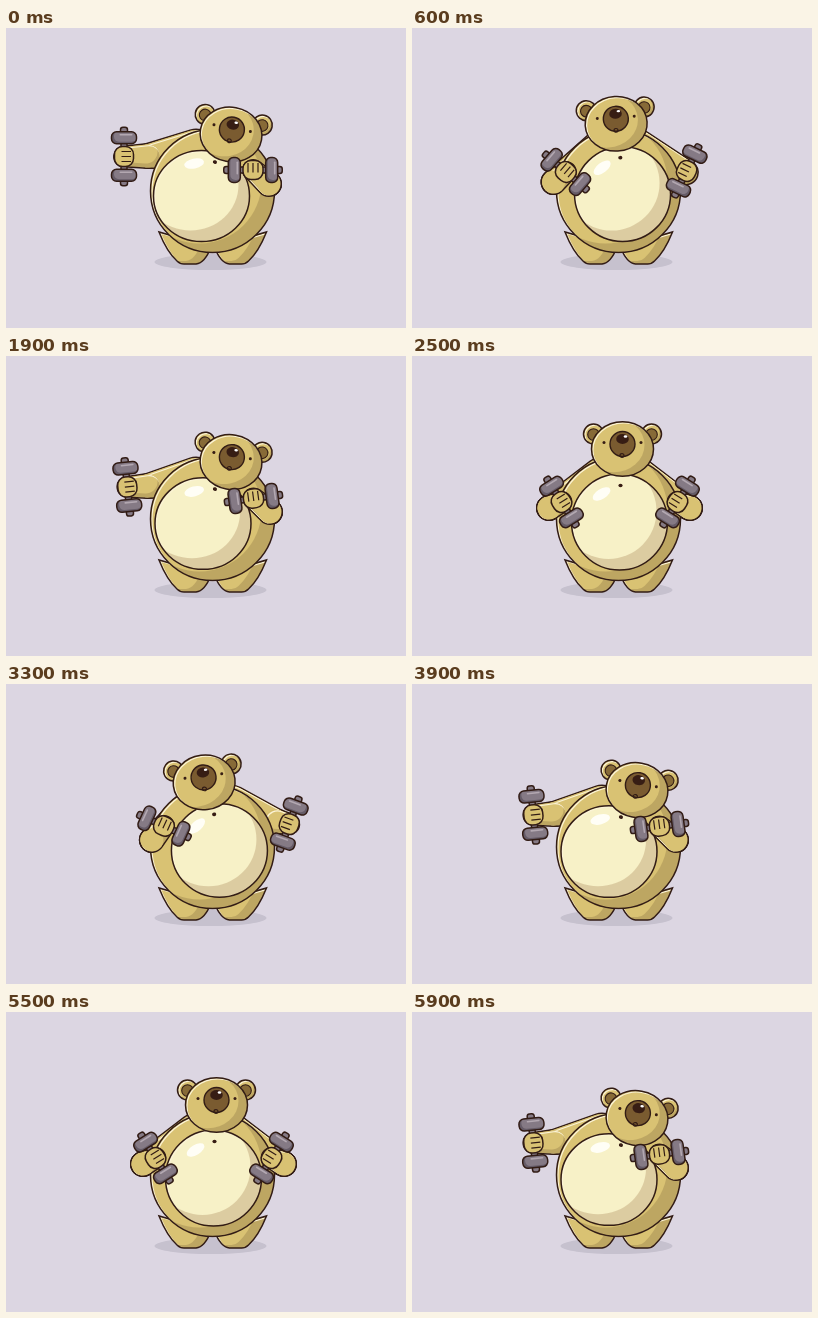
These frames come from a looping animation (400 by 300 pixels, 6000 ms). An HTML page with a canvas:

```html
<!DOCTYPE html>
<html lang="en">
<head>
<meta charset="utf-8">
<title>Bear with dumbbells</title>
<style>
html, body { margin: 0; width: 100%; height: 100%; overflow: hidden; background: #dcd6e2; }
canvas { display: block; width: 400px; height: 300px; }
</style>
</head>
<body>
<canvas id="stage" width="400" height="300"></canvas>
<script>
const ctx = document.getElementById('stage').getContext('2d');
const TAU = Math.PI * 2;
const RAD = Math.PI / 180;
const MIRROR = 415;
const LINE = 1.5;
const C = {
  bg: '#dcd6e2', floor: '#c6c1ce', line: '#321c15',
  fur: '#d9c273', furShade: '#bda662', rim: '#fbf3d6',
  belly: '#f7f1c7', bellyShade: '#dccca1', ear: '#876a37',
  muzzle: '#7a5b30', nose: '#371d14',
  iron: '#857a85', ironShade: '#655b67', ironLight: '#b3a8b1'
};

// Pose of one arm, from folded (-1) to stretched out (1).
const STRETCH = [-1, -.87, -.5, 0, .5, .87, 1];
const ARM = {
  handX: [168, 167.5, 158, 149.5, 131.5, 121.5, 118],
  handY: [142, 142.5, 142, 146, 140, 131, 128.5],
  elbowX: [152, 151, 146, 137, 145, 142, 142],
  elbowY: [156, 156, 156, 152, 137, 130, 128],
  angle: [0, 8, 24, 58, 70, 84, 90]
};
const LEAN = [0, .5, .87, 1];
const HEAD = { x: [0, 12.5, 14.5, 14.5], y: [0, 5.5, 13, 13.5], tilt: [0, 7, 10, 10.5] };

let lightSide = 1;

function lerpKeys(keys, values, k) {
  let i = 1;
  while (i < keys.length - 1 && k > keys[i]) i++;
  const f = (k - keys[i - 1]) / (keys[i] - keys[i - 1]);
  return values[i - 1] + (values[i] - values[i - 1]) * f;
}

function oval(x, y, rx, ry = rx, turn = 0) {
  const p = new Path2D();
  p.ellipse(x, y, rx, ry, turn, 0, TAU);
  return p;
}

function box(x, y, w, h, r) {
  const p = new Path2D();
  p.roundRect(x - w / 2, y - h / 2, w, h, r);
  return p;
}

function limb(x1, y1, r1, x2, y2, r2) {
  const dir = Math.atan2(y2 - y1, x2 - x1);
  const spread = Math.acos((r1 - r2) / Math.hypot(x2 - x1, y2 - y1));
  const p = new Path2D();
  p.arc(x1, y1, r1, dir + spread, dir - spread + TAU);
  p.arc(x2, y2, r2, dir - spread, dir + spread);
  p.closePath();
  return p;
}

function fill(path, color) {
  ctx.fillStyle = color;
  ctx.fill(path);
}

function stroke(path, width = LINE, color = C.line) {
  ctx.strokeStyle = color;
  ctx.lineWidth = width;
  ctx.stroke(path);
}

function within(path, draw) {
  ctx.save();
  ctx.clip(path);
  draw();
  ctx.restore();
}

// Thin light line inside the edge that faces the upper left.
function rim(path) {
  within(path, () => {
    ctx.translate(1.4 * lightSide, 1.2);
    stroke(path, 1.2, C.rim);
  });
}

// Lit solid: the shade shows where the shifted light copy does not reach.
function solid(path, light, shade, dx, dy) {
  fill(path, shade);
  within(path, () => {
    ctx.translate(dx * lightSide, dy);
    fill(path, light);
  });
  rim(path);
}

function mirrored(draw) {
  ctx.save();
  ctx.translate(MIRROR, 0);
  ctx.scale(-1, 1);
  lightSide = -1;
  draw();
  lightSide = 1;
  ctx.restore();
}

function armPose(stretch) {
  const pose = {};
  for (const key in ARM) pose[key] = lerpKeys(STRETCH, ARM[key], stretch);
  pose.upper = limb(190, 121, 19, pose.elbowX, pose.elbowY, 11.5);
  pose.fore = limb(pose.elbowX, pose.elbowY, 11.5, pose.handX, pose.handY, 9.5);
  return pose;
}

function foot() {
  const p = new Path2D('M153 204 Q161 224 171 233 Q174 236 178 236 L190 236 Q199 235 205 219 Z');
  solid(p, C.fur, C.furShade, -10, -3);
  stroke(p);
}

function plate(offset) {
  const p = box(offset, 0, 12, 25, 5);
  fill(p, C.ironShade);
  within(p, () => {
    fill(box(offset - 1.5, -1.5, 11, 23, 5), C.iron);
    fill(box(offset - 3, -2, 1.6, 13, .8), C.ironLight);
  });
  stroke(p);
}

function handWithWeight(pose) {
  ctx.save();
  ctx.translate(pose.handX, pose.handY);
  ctx.rotate(pose.angle * RAD);
  for (const side of [-1, 1]) {
    const cap = box(side * 26, 0, 6.5, 7, 2.5);
    fill(cap, C.iron);
    stroke(cap);
  }
  const bar = box(0, 0, 34, 6, 1);
  fill(bar, C.iron);
  stroke(bar);
  plate(-18.7);
  plate(18.7);
  const fist = box(0, 0, 20, 19, 8);
  fill(fist, C.fur);
  stroke(fist);
  const fingers = new Path2D();
  for (const x of [-5, 0, 5]) {
    fingers.moveTo(x, -7);
    fingers.lineTo(x, 2.5);
  }
  stroke(fingers, 1.2);
  ctx.restore();
}

function armFill(pose) {
  for (const part of [pose.upper, pose.fore]) stroke(part, LINE * 2);
  solid(pose.upper, C.fur, C.furShade, -3, -5);
  solid(pose.fore, C.fur, C.furShade, -2, -4);
}

function torso() {
  const p = oval(206.5, 163, 62, 61.5);
  solid(p, C.fur, C.furShade, -13, -9);
  stroke(p);
}

function belly(u) {
  const p = oval(207.5 - 12 * u, 166 + 2 * u * u, 48, 48 - 2.5 * Math.abs(u));
  solid(p, C.belly, C.bellyShade, -11, -11);
  stroke(p);
  ctx.save();
  ctx.translate(207.5 - 12 * u, 166 + 2 * u * u);
  ctx.rotate(20 * u * RAD);
  fill(oval(-18, -28, 10, 5, -32 * RAD), '#fffef6');
  fill(oval(1, -36.5, 2.1, 1.8), C.nose);
  ctx.restore();
}

function ear(x) {
  const p = oval(x, -15, 10);
  solid(p, C.fur, C.furShade, -2, -2);
  stroke(p);
  const inner = oval(x, -14.5, 5.8);
  fill(inner, C.ear);
  stroke(inner, 1.1);
}

function head(u) {
  const side = Math.sign(u);
  const at = key => lerpKeys(LEAN, HEAD[key], Math.abs(u));
  ctx.save();
  ctx.translate(210.5 + side * at('x'), 93 + at('y'));
  ctx.rotate(side * at('tilt') * RAD);
  ear(-29);
  ear(29);

  const skull = oval(0, 0, 31, 27.3);
  solid(skull, C.fur, C.furShade, -9, -4);
  stroke(skull);

  for (const x of [-18.5, 18.5]) fill(oval(x, -6.5, 1.5), C.nose);
  const muzzle = oval(0, -5, 12.5);
  fill(muzzle, C.muzzle);
  stroke(muzzle, 1.4);
  fill(oval(0, -10, 6.3, 5), C.nose);
  fill(oval(3, -12.5, 1.8, 1.2), '#fff');
  stroke(oval(-.5, 6.5, 2, 1.8), 1.2);
  ctx.restore();
}

function draw(ms) {
  const phase = Math.floor(ms / 100) * 100 % 2000 / 2000;
  const swing = 4 * Math.abs(phase - .5) - 1;
  const u = (swing + Math.sin(swing * Math.PI / 2)) / 2;
  const left = armPose(u), right = armPose(-u);

  ctx.fillStyle = C.bg;
  ctx.fillRect(0, 0, 400, 300);
  fill(oval(204.5, 234, 56, 8), C.floor);
  foot();
  ctx.save();
  ctx.translate(-1.5, 0);
  mirrored(foot);
  ctx.restore();
  armFill(left);
  mirrored(() => armFill(right));
  torso();
  belly(u);
  head(u);

  // A folded forearm passes in front of the belly.
  const front = pose => {
    if (pose.handX > pose.elbowX) {
      stroke(pose.fore, LINE * 2);
      solid(pose.fore, C.fur, C.furShade, -2, -4);
      // Hide the seam between upper arm and forearm.
      within(pose.upper, () => fill(oval(pose.elbowX, pose.elbowY, 11.5), C.fur));
    }
    handWithWeight(pose);
  };
  front(left);
  mirrored(() => front(right));
}

const start = performance.now();
function tick() {
  draw((performance.now() - start) % 6000);
  requestAnimationFrame(tick);
}
tick();
</script>
</body>
</html>
```
